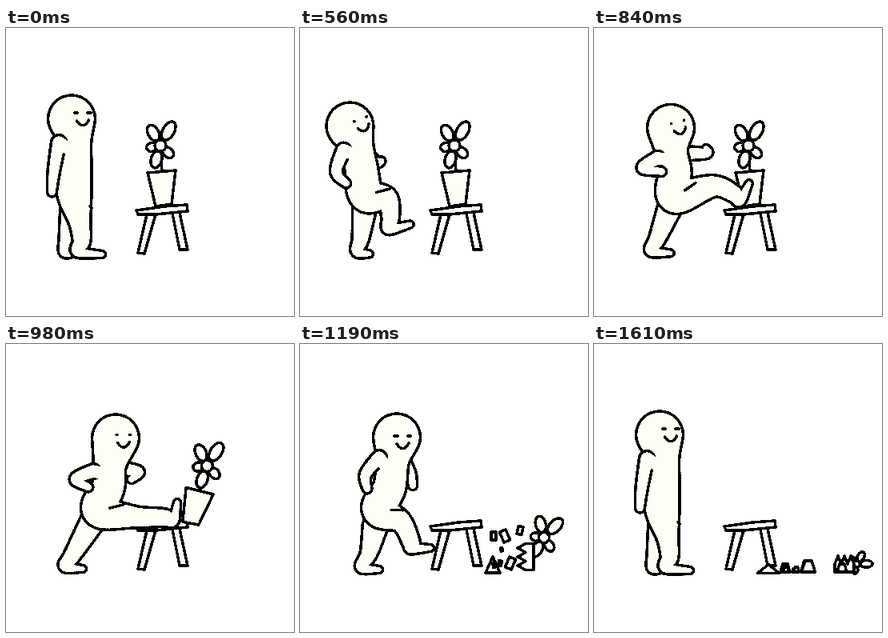
Animation of 360x360 px, one loop 1960 ms. Source, as an HTML page:

```html
<!DOCTYPE html>
<html lang="en">
<head>
<meta charset="utf-8">
<title>Kick</title>
<style>
html, body { margin: 0; width: 100%; height: 100%; overflow: hidden; background: #fff; }
svg { display: block; width: 100vw; height: 100vh; }
</style>
</head>
<body>
<svg id="stage" viewBox="0 0 360 360" shape-rendering="crispEdges" stroke-linecap="round" stroke-linejoin="round"></svg>
<script>
const STEP = 70, LOOP = 1960, INK = '#000', SKIN = '#fbfff6', LINE = 3.5;
const stage = document.getElementById('stage');

function set(el, attrs) {
  for (const k in attrs) el.setAttribute(k, attrs[k]);
  return el;
}
function add(tag, attrs = {}, parent = stage) {
  return parent.appendChild(set(document.createElementNS('http://www.w3.org/2000/svg', tag), attrs));
}
const drawn = { fill: SKIN, stroke: INK, 'stroke-width': LINE };
const lerp = (a, b, u) => a + (b - a) * u;
const mix = (a, b, u) => a.map((v, i) => lerp(v, b[i], u));

// Catmull-Rom for one number
function spline(a, b, c, d, u) {
  const m = (c - a) / 2, n = (d - b) / 2, w = c - b;
  return b + u * (m + u * (3 * w - 2 * m - n + u * (m + n - 2 * w)));
}

// Joint radii: head to toe, standing leg, arm
const RADII = {
  body: [29.5, 21, 21, 22, 14, 11.5, 8, 4.5],
  leg: [16, 11, 8, 4.5],
  arm: [9.5, 8, 6],
  far: [9, 7.5, 5.5]
};

// body: head, neck, chest, hip, knee, ankle, heel, toe
// leg: hip, ankle, heel, toe; arms: shoulder, elbow, hand
// face: x, y, tilt, half width of an eye
const stand = {
  body: [82, 113.5, 86, 140, 86, 172, 85, 205, 92, 242, 94.5, 266, 90, 279.5, 120, 283],
  leg: [84, 215, 77, 262, 73.5, 279, 80, 283],
  arm: [66, 143, 60, 178, 57.5, 205],
  far: [90, 160, 90, 180, 90, 195],
  face: [95.5, 106, 0, 2]
};
const ready = {
  ...stand,
  body: [79, 113.5, ...stand.body.slice(2)],
  face: [97, 107, -8, 0.3]
};
const lean = {
  body: [56, 130, 64, 151, 74, 179, 85, 212, 129, 187, 139, 208, 141, 222, 162, 207],
  leg: [82, 222, 76, 262, 70, 279, 94, 282],
  arm: [50, 162, 37, 180, 63, 183],
  far: [86, 157, 109, 156, 118, 141],
  face: [64, 120, -29, 0.3]
};
const kick = {
  body: [137, 117.5, 130, 150, 128, 178, 117, 208, 160, 216, 197, 217, 209, 220, 214, 198],
  leg: [108, 222, 83, 264, 74, 278, 96, 281],
  arm: [109, 159, 87, 169, 103, 179],
  far: [148, 156, 166, 160, 157, 169],
  face: [146.5, 113.5, 0, 0.3]
};
const lower = {
  body: [121, 116.5, 116, 145, 112, 179, 99, 207, 126, 222, 139, 248, 140, 255, 163, 255],
  leg: [94, 228, 86, 262, 77, 279, 99, 282],
  arm: [99, 142, 82, 163, 84, 181],
  far: [131, 150, 138, 163, 141, 177],
  face: [128, 115, 0, 2]
};
const settle = {
  body: [93, 114, 92, 143, 91, 172, 89, 200, 106, 238, 117, 262, 112, 272, 131, 275],
  leg: [86, 210, 79, 258, 75, 277, 97, 280],
  arm: [77, 146, 68, 174, 66.5, 196],
  far: [110, 165, 110, 180, 113, 191],
  face: [103, 107.5, 0, 0.3]
};
const poses = [ready, lean, kick, lower, settle, stand];
const poseTicks = [6, 10, 14, 17, 19, 21];
const HIT = 13, CRASH = 17, AIR = 19, FLAT = 21, REST = 23;

// Circles along a chain of joints; grow widens or narrows the limb
function tube(joints, radii, grow) {
  const n = radii.length, per = 14;
  const at = i => {
    i = Math.max(0, Math.min(n - 1, i));
    return [joints[2 * i], joints[2 * i + 1], radii[i]];
  };
  let d = '';
  for (let k = 0; k <= (n - 1) * per; k++) {
    const i = Math.min(n - 2, Math.floor(k / per)), u = k / per - i;
    const [p, q, s, t] = [at(i - 1), at(i), at(i + 1), at(i + 2)];
    const [x, y, rad] = q.map((v, j) => spline(p[j], v, s[j], t[j], u));
    const r = rad + grow;
    d += `M${x - r} ${y}a${r} ${r} 0 1 0 ${2 * r} 0a${r} ${r} 0 1 0 ${-2 * r} 0`;
  }
  return d;
}

const stool = add('g', drawn);
add('path', { d: 'M176 233L165 281L173 282L187 233M208 232L217 277L227 277L217 231' }, stool);
add('path', { d: 'M163 228L198 223L226 221L227 229L187 233L165 233Z' }, stool);

const pot = add('g', drawn);
add('path', { d: 'M195 180L193 147' }, pot);
add('path', { d: 'M177 181L212 178L207 220L187 223Z' }, pot);

// Petals as angle and reach
const bloom = add('g', drawn);
for (const [angle, reach] of [[-61, 21], [-119, 18], [170, 11], [42, 13], [106, 18]]) {
  add('ellipse', { cx: reach, rx: reach * 0.6, ry: 3.5 + reach * 0.18, transform: `rotate(${angle})` }, bloom);
}
add('circle', { r: 7 }, bloom);

// Bits: x, y at the crash, x, y in the air, landing x, size
const BITS = [
  [256, 240, 255, 200, 267, 14], [275, 233, 304, 219, 310, 10], [242, 240, 237, 239, 239, 10],
  [252, 257, 262, 253, 250, 4], [263, 274, 267, 272, 268, 14], [250, 274, 242, 283, 240, 6],
  [243, 276, 255, 282, 253, 6]
];
const debris = add('g', drawn);
const crown = add('path', {}, debris), heap = add('path', {}, debris);
const bits = BITS.map(() => add('path', {}, debris));

const limbs = {};
for (const k of ['far', 'leg', 'body', 'arm']) {
  limbs[k] = [add('path', { fill: INK }), add('path', { fill: SKIN })];
}
const shoulder = add('path', { fill: SKIN });
const crease = add('path', { ...drawn, fill: 'none' });
const face = add('path', { ...drawn, fill: 'none' });

function poseAt(tick) {
  if (tick < poseTicks[0] || tick >= FLAT) return stand;
  const i = poseTicks.findLastIndex(v => v <= tick);
  const u = (tick - poseTicks[i]) / (poseTicks[i + 1] - poseTicks[i]);
  const [a, b, c, d] = [-1, 0, 1, 2].map(j => poses[Math.max(0, Math.min(5, i + j))]);
  const now = {};
  for (const k in stand) now[k] = b[k].map((v, j) => spline(a[k][j], v, c[k][j], d[k][j], u));
  return now;
}

function drawMan(tick) {
  const p = poseAt(tick);
  for (const k in limbs) {
    limbs[k].forEach((el, i) => set(el, { d: tube(p[k], RADII[k], LINE * (i ? -0.5 : 0.5)) }));
  }
  const [, , nx, ny, cx, cy, hx, hy, kx, ky] = p.body;

  // Opens the arm towards the trunk
  const r = RADII.arm[0];
  const inner = [p.arm[0], p.arm[1], (nx + cx) / 2, (ny + cy) / 2];
  set(shoulder, { d: tube(inner, [r, r], -LINE / 2) });

  // The hip fold follows the thigh and fades as the leg straightens
  const thigh = Math.atan2(ky - hy, kx - hx), fold = thigh * 0.8 - 0.38;
  const point = len => `${hx + len * Math.cos(fold)} ${hy + len * Math.sin(fold)}`;
  set(crease, { d: `M${point(30)}L${point(30 - 17 * Math.cos(thigh))}` });

  const [x, y, tilt, w] = p.face;
  set(face, {
    d: `M${-8 - w} 0h${2 * w}M${8.5 - w} 0h${2 * w}M-7 10Q1 22 8 9`,
    transform: `translate(${x} ${y}) rotate(${tilt})`
  });
}

// Broken edge on a flat base; a single tooth is a triangle
function zigzag([x, y, w, h, turn], teeth) {
  let d = `M${-w / 2} ${h / 2}`;
  for (let i = 0; i <= 2 * teeth; i++) {
    d += `L${w * (i / (2 * teeth) - 0.5)} ${i % 2 ? -h / 2 : teeth > 1 ? 0 : h / 2}`;
  }
  return { d: d + `L${w / 2} ${h / 2}Z`, transform: `translate(${x} ${y}) rotate(${turn})` };
}

// Crash, air and rest values over time
function staged(tick, a, b, c) {
  return tick < AIR ? mix(a, b, (tick - CRASH) / 2) : mix(b, c, Math.min(1, (tick - AIR) / 2));
}

// Parabola through a at 0, b at 1/3 and c at 1
const toss = (a, b, c, s) => a * (1 - 3 * s) * (1 - s) + b * 4.5 * s * (1 - s) + c * s * (3 * s - 1) / 2;

function drawBit(el, [x0, y0, x1, y1, x2, size], s, i) {
  const x = toss(x0, x1, x2, s), y = Math.min(285 - size / 2, toss(y0, y1, 285 - size / 2, s));
  const top = size * 0.3, base = top * (1 + s * s), h = size / 2;
  set(el, {
    d: `M${-top} ${-h}H${top}L${base} ${h}H${-base}Z`,
    transform: `translate(${x} ${y}) rotate(${(i * 37 % 50 - 25) * (1 - s)})`
  });
}

function drawPlant(tick) {
  const broken = tick >= CRASH;
  pot.style.display = broken ? 'none' : '';
  debris.style.display = broken ? '' : 'none';
  if (!broken) {
    const n = tick - HIT, flying = n >= 0;
    const dx = flying ? 17 * (n + 1) : 0, dy = flying ? 2.7 * n * n : 0, turn = flying ? 8 + 11 * n : 0;
    const a = turn * Math.PI / 180, c = Math.cos(a), s = Math.sin(a);
    set(pot, { transform: `translate(${dx} ${dy}) rotate(${turn} 197 221)` });
    set(bloom, { transform: `translate(${197 + dx - 4 * c + 74 * s} ${221 + dy - 4 * s - 74 * c}) rotate(${turn / 5})` });
    return;
  }
  const [x, y, size, turn] = staged(tick, [305, 242, 0.95, 15], [326, 272, 0.7, 60], [328, 275, 0.6, 60]);
  set(bloom, { transform: `translate(${x} ${y}) rotate(${turn}) scale(${size})`, 'stroke-width': LINE / size });
  set(crown, zigzag(staged(tick, [282, 266, 33, 20, -90], [308, 269, 25, 28, 0], [313, 275, 24, 20, 0]), 3));
  set(heap, zigzag(staged(tick, [241, 276, 18, 20, 0], [218, 281, 27, 11, 0], [218, 281, 27, 11, 0]), 1));
  const s = (Math.min(tick, REST) - CRASH) / (REST - CRASH);
  bits.forEach((el, i) => drawBit(el, BITS[i], s, i));
}

let last = -1;
function frame() {
  const tick = Math.floor(performance.now() % LOOP / STEP);
  if (tick !== last) {
    set(bloom, { 'stroke-width': LINE });
    drawMan(tick);
    drawPlant(tick);
    last = tick;
  }
  requestAnimationFrame(frame);
}
frame();
</script>
</body>
</html>
```
